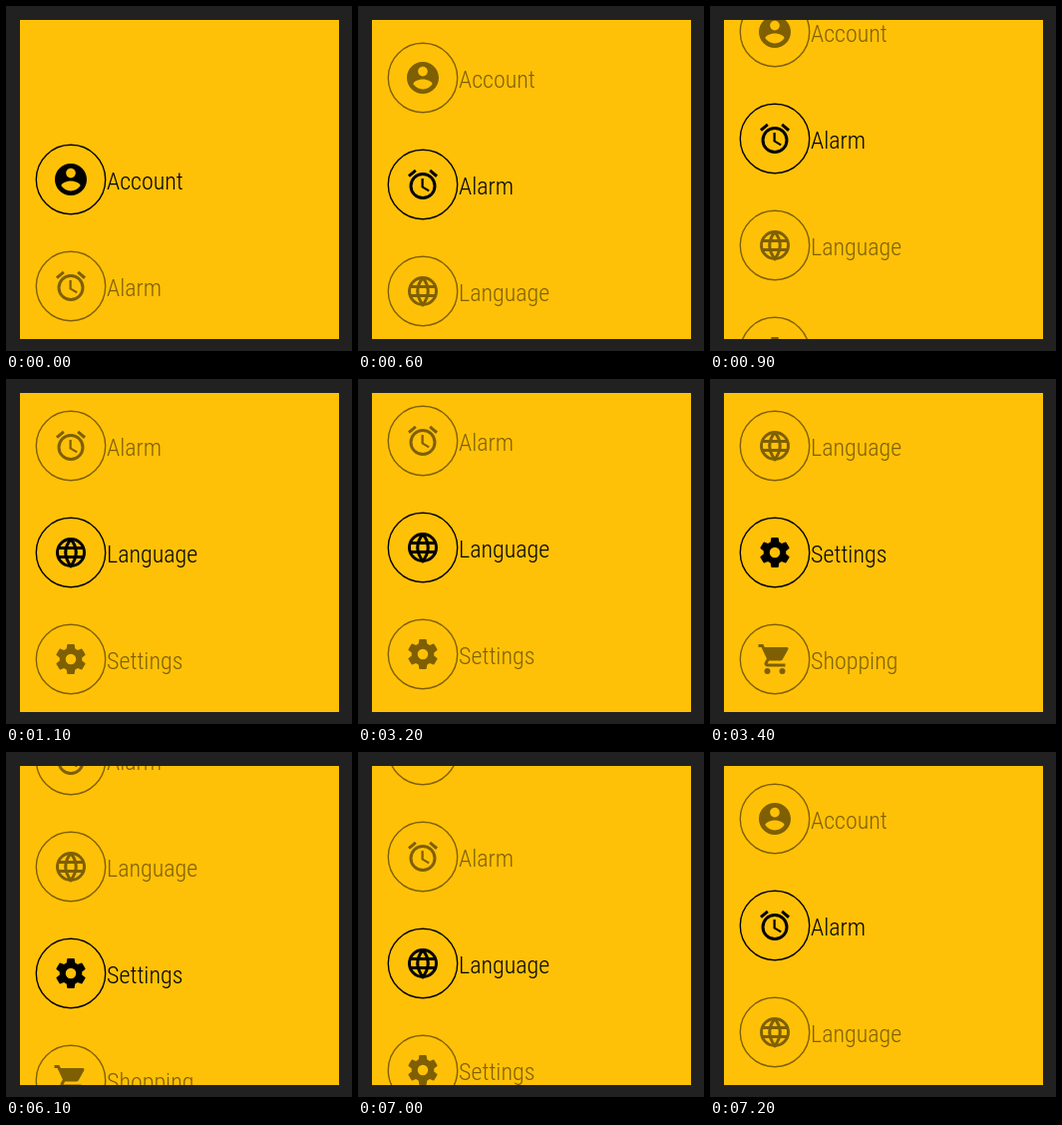
Recreate the animation shown at these times as an HTML page. Size 347 px wide and 346 px high, loop 8 s.

```html
<!DOCTYPE html>
<html lang="en">
<head>
<meta charset="utf-8">
<title>Snapping menu</title>
<style>
html, body { margin: 0; width: 100%; height: 100%; overflow: hidden; background: #212121; }
svg { display: block; width: 100%; height: 100%; }
text { font: 300 24px "Roboto Condensed", Roboto, sans-serif; font-stretch: 75%; }
.ring { fill: none; stroke: #000; stroke-width: 1.4; }
.line { fill: none; stroke: #000; stroke-width: 2; }
</style>
</head>
<body>
<svg viewBox="0 0 347 346">
  <clipPath id="view"><rect x="14" y="14" width="320" height="320"/></clipPath>
  <rect width="347" height="346" fill="#212121"/>
  <rect x="14" y="14" width="320" height="320" fill="#ffc107"/>
  <g id="list" clip-path="url(#view)"></g>
</svg>
<script>
const LOOP = 8000, TICK = 100, ROW = 107, CENTER = 174, SNAP = 200;

const path = d => `<path d="${d}"/>`;
const tooth = a => `<path transform="rotate(${a} 12 12)" d="M9.51 2.42Q9.57 2 10 2h4q.43 0 .49.42L15 6H9z"/>`;

const items = [
  { label: 'Account', size: 1.6, icon: path('M12 2C6.48 2 2 6.48 2 12s4.48 10 10 10 10-4.48 10-10S17.52 2 12 2zm0 3c1.66 0 3 1.34 3 3s-1.34 3-3 3-3-1.34-3-3 1.34-3 3-3zm0 14.2c-2.5 0-4.71-1.28-6-3.22.03-1.99 4-3.08 6-3.08 1.99 0 5.97 1.09 6 3.08-1.29 1.94-3.5 3.22-6 3.22z') },
  { label: 'Alarm', size: 1.5, icon:
    path('M22 5.72l-4.6-3.86-1.29 1.53 4.6 3.86zM7.88 3.39L6.6 1.86 2 5.71l1.29 1.53zM12.5 8H11v6l4.75 2.85.75-1.23-4-2.37z') +
    '<circle class="line" cx="12" cy="13" r="8"/>' },
  { label: 'Language', size: 1.5, icon:
    '<circle class="line" cx="12" cy="12" r="9"/>' +
    '<path class="line" d="M12 3Q5 12 12 21Q19 12 12 3M3.5 9h17M3.5 15h17"/>' },
  { label: 'Settings', size: 1.5, icon:
    '<circle class="line" style="stroke-width:4" cx="12" cy="12" r="5.5"/>' +
    [0, 60, 120, 180, 240, 300].map(tooth).join('') },
  { label: 'Shopping', size: 1.5, icon:
    path('M1 2v2h2l3.6 7.59-1.35 2.45c-.16.28-.25.61-.25.96 0 1.1.9 2 2 2h12v-2H7.42c-.14 0-.25-.11-.25-.25l.03-.12.9-1.63h7.45c.75 0 1.41-.41 1.75-1.03l3.58-6.49c.08-.14.12-.31.12-.48 0-.55-.45-1-1-1H5.21l-.94-2z') +
    '<circle cx="7" cy="20" r="2"/><circle cx="17" cy="20" r="2"/>' }
];

const list = document.getElementById('list');
list.innerHTML = items.map(({ label, size, icon }) => `<g>
  <circle class="ring" cx="65" r="34.7"/>
  <g transform="translate(65 0) scale(${size}) translate(-12 -12)">${icon}</g>
  <text x="101" y="10">${label}</text></g>`).join('');
const rows = [...list.children];

// Each snap: start time and signed row step
const snaps = [[455, 1], [852, 1], [3188, 1], [6046, -1], [6955, -1]];

// cubic-bezier(.25, .1, .25, 1), solved for x by bisection
function ease(x) {
  if (x <= 0) return 0;
  if (x >= 1) return 1;
  const bez = (a, b, u) => 3 * a * u * (1 - u) ** 2 + 3 * b * u * u * (1 - u) + u ** 3;
  let lo = 0, hi = 1;
  for (let i = 0; i < 24; i++) {
    const mid = (lo + hi) / 2;
    if (bez(.25, .25, mid) < x) lo = mid; else hi = mid;
  }
  return bez(.1, 1, lo);
}

function render(ms) {
  const t = Math.floor(ms % LOOP / TICK) * TICK;
  const pos = snaps.reduce((sum, [start, step]) => sum + step * ease((t - start) / SNAP), 0);
  const active = Math.round(pos);
  rows.forEach((row, i) => {
    row.setAttribute('transform', `translate(0 ${CENTER + Math.round((i - pos) * ROW)})`);
    row.setAttribute('opacity', i === active ? 1 : .5);
  });
}

const begin = performance.now();
function loop() {
  render(performance.now() - begin);
  requestAnimationFrame(loop);
}
loop();
</script>
</body>
</html>
```
